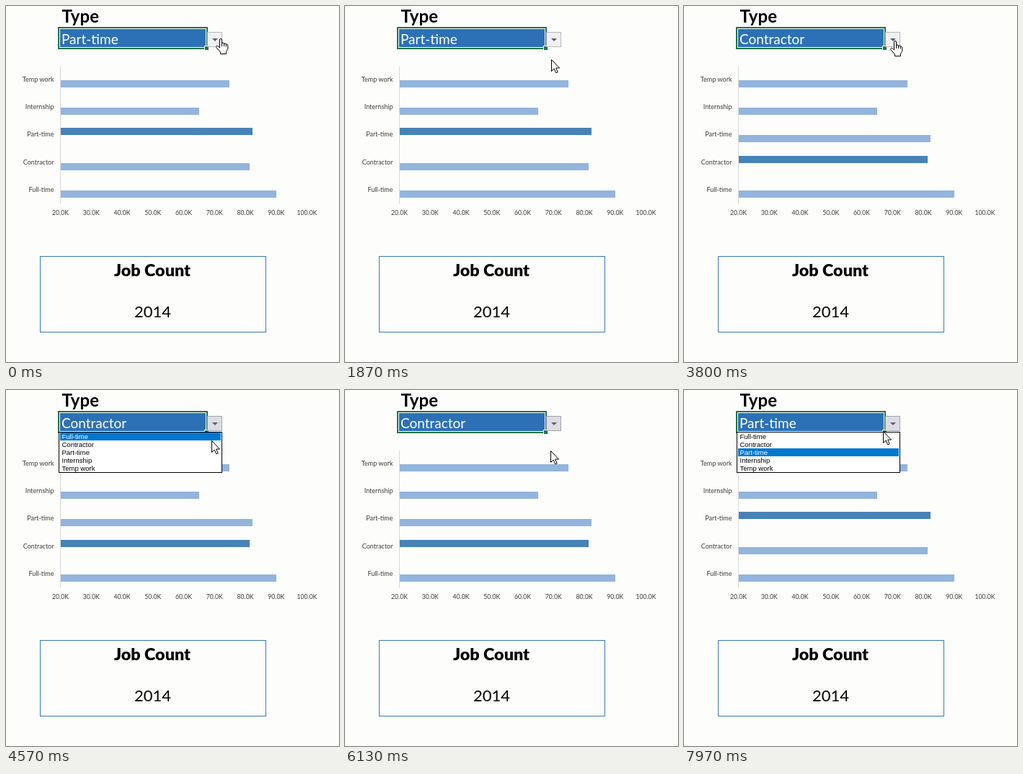
These frames come from a looping animation (462x494 px, 8000 ms). An HTML page with a canvas:

```html
<!DOCTYPE html>
<html lang="en">
<head>
<meta charset="utf-8">
<title>Job type dashboard</title>
<style>
  html, body { margin: 0; width: 100%; height: 100%; overflow: hidden; background: #fdfdfc; }
  canvas { display: block; width: 462px; height: 494px; }
</style>
</head>
<body>
<canvas id="stage" width="462" height="494"></canvas>
<script>
const ctx = document.getElementById('stage').getContext('2d');
const LOOP = 8000;
const PAPER = '#fdfdfc';
const GREEN = '#217346';
const SANS = 'Lato, "Open Sans", sans-serif';
const UI = '"Liberation Sans", Arial, sans-serif';

const types = ['Full-time', 'Contractor', 'Part-time', 'Internship', 'Temp work'];
const barEnds = [375, 338, 342, 268, 310];

// Each visit to the list: opened, closed, chart updated, chosen row
const visits = [
  { open: 870, close: 1820, apply: 1930, pick: 1 },
  { open: 4080, close: 6110, apply: 6230, pick: 2 },
  { open: 7760, close: 9000, apply: 9000, pick: 2 }
];

// Pointer hotspot: time, x, y
const path = [
  [0, 297, 45], [870, 297, 45], [1030, 290, 61], [1300, 288, 68],
  [1700, 286, 74], [2350, 286, 74], [3030, 287, 57], [3500, 292, 48],
  [4150, 292, 48], [4570, 285, 70], [5150, 291, 77], [5750, 285, 84],
  [6450, 285, 84], [7050, 292, 49], [7700, 291, 48], [7970, 276, 57],
  [8000, 276, 57]
];

function pointerAt(t) {
  const i = path.findIndex((p, n) => n && t <= p[0]);
  const [t0, x0, y0] = path[i - 1];
  const [t1, x1, y1] = path[i];
  const u = (t - t0) / (t1 - t0);
  const e = u * u * (3 - 2 * u);
  return { x: Math.round(x0 + (x1 - x0) * e), y: Math.round(y0 + (y1 - y0) * e) };
}

function stateAt(t) {
  const pointer = pointerAt(t);
  let selected = 2;
  for (const v of visits) if (t >= v.apply) selected = v.pick;
  const open = visits.some(v => t >= v.open && t < v.close);
  const pressed = visits.some(v => t >= v.open && t < v.close + 45);
  const row = Math.floor((pointer.y - 60) / 11);
  const hover = row >= 0 && row < types.length ? row : selected;
  return { pointer, selected, open, pressed, hover };
}

function rect(x, y, w, h, color) {
  ctx.fillStyle = color;
  ctx.fillRect(x, y, w, h);
}

function frame(x, y, w, h, color, line = 1) {
  ctx.strokeStyle = color;
  ctx.lineWidth = line;
  ctx.strokeRect(x + line / 2, y + line / 2, w - line, h - line);
}

function text(str, x, y, font, color = '#000', align = 'left') {
  ctx.font = font;
  ctx.fillStyle = color;
  ctx.textAlign = align;
  ctx.fillText(str, x, y);
}

function drawCell(s) {
  text('Type', 77.5, 23, `bold 24px ${SANS}`);
  frame(72, 29, 208, 31, GREEN, 2);
  frame(74, 31, 204, 27, '#fff', 1);
  rect(75, 32, 202, 25, '#2c71b6');
  text(types[s.selected], 77, 53, `19px ${SANS}`, '#fff');
  rect(275, 55, 6, 6, PAPER);
  rect(276, 56, 5, 5, GREEN);
}

function drawButton(pressed) {
  rect(280, 36, 20, 21, pressed ? '#dcdde4' : '#f1f1f3');
  frame(279, 36, 21, 21, pressed ? '#a4a5ac' : '#b8b8bc');
  ctx.fillStyle = '#606064';
  ctx.beginPath();
  ctx.moveTo(286, 45);
  ctx.lineTo(294, 45);
  ctx.lineTo(290, 49);
  ctx.fill();
}

function drawChart(selected) {
  const ink = '#3c3c3c';
  rect(75, 84, 1, 191, '#d9d9d9');
  types.forEach((name, i) => {
    const y = Math.round(256 - i * 38.3);
    const on = i === selected;
    rect(76, on ? y - 10 : y, barEnds[i] - 76, 10, on ? '#4783b5' : '#93b5dc');
    text(name, 66.5, y + 2, `9px ${SANS}`, ink, 'right');
  });
  for (let k = 2; k <= 10; k++) {
    text(`${k * 10}.0K`, 75.5 + (k - 2) * 42.75, 290, `8.7px ${SANS}`, ink, 'center');
  }
}

function drawCard() {
  frame(47, 347, 314, 106, '#3a7ab8');
  text('Job Count', 203, 375, `900 23.3px ${SANS}`, '#000', 'center');
  text('2014', 203.5, 432, `22px ${SANS}`, '#000', 'center');
}

function drawList(hover) {
  rect(73, 58, 227, 57, '#fff');
  frame(73, 58, 227, 57, '#000');
  types.forEach((name, i) => {
    const y = 59 + i * 11;
    if (i === hover) rect(75, y, 223, 11, '#0078d0');
    text(name, 77.5, y + 9, `9.5px ${UI}`, i === hover ? '#fff' : '#000');
  });
}

const arrow = new Path2D('M.5 .5V16.5L4.2 13L6.8 18.8L9.2 17.7L6.7 12H11.5Z');
const hand = new Path2D(
  'M5.5 13V2Q5.5 .5 7 .5T8.5 2V7.5Q8.5 6 10 6T11.5 7.5V8Q11.5 7 13 7' +
  'T14.3 8.5V9Q14.5 8 15.6 8.2Q16.8 8.5 16.8 10V14.5L14.5 18.5V21.5' +
  'H6.5V19L1 12.8Q.2 11.3 1.2 10.6Q2.5 9.8 4 11.5Z');
const knuckles = new Path2D('M8.5 7V11M11.5 7.5V11M14.3 8.5V11.5');

function drawPointer({ x, y }, isHand) {
  ctx.save();
  ctx.translate(isHand ? x - 6 : x, y);
  ctx.fillStyle = '#fff';
  ctx.strokeStyle = '#000';
  ctx.lineWidth = 1;
  ctx.lineJoin = 'round';
  const shape = isHand ? hand : arrow;
  ctx.fill(shape);
  ctx.stroke(shape);
  if (isHand) ctx.stroke(knuckles);
  ctx.restore();
}

function draw(t) {
  const s = stateAt(t);
  const { x, y } = s.pointer;
  rect(0, 0, 462, 494, PAPER);
  drawChart(s.selected);
  drawCard();
  drawCell(s);
  drawButton(s.pressed);
  if (s.open) drawList(s.hover);
  drawPointer(s.pointer, !s.open && x >= 279 && x <= 300 && y >= 36 && y <= 58);
}

const start = performance.now();
function tick() {
  draw((performance.now() - start) % LOOP);
  requestAnimationFrame(tick);
}
tick();
</script>
</body>
</html>
```
